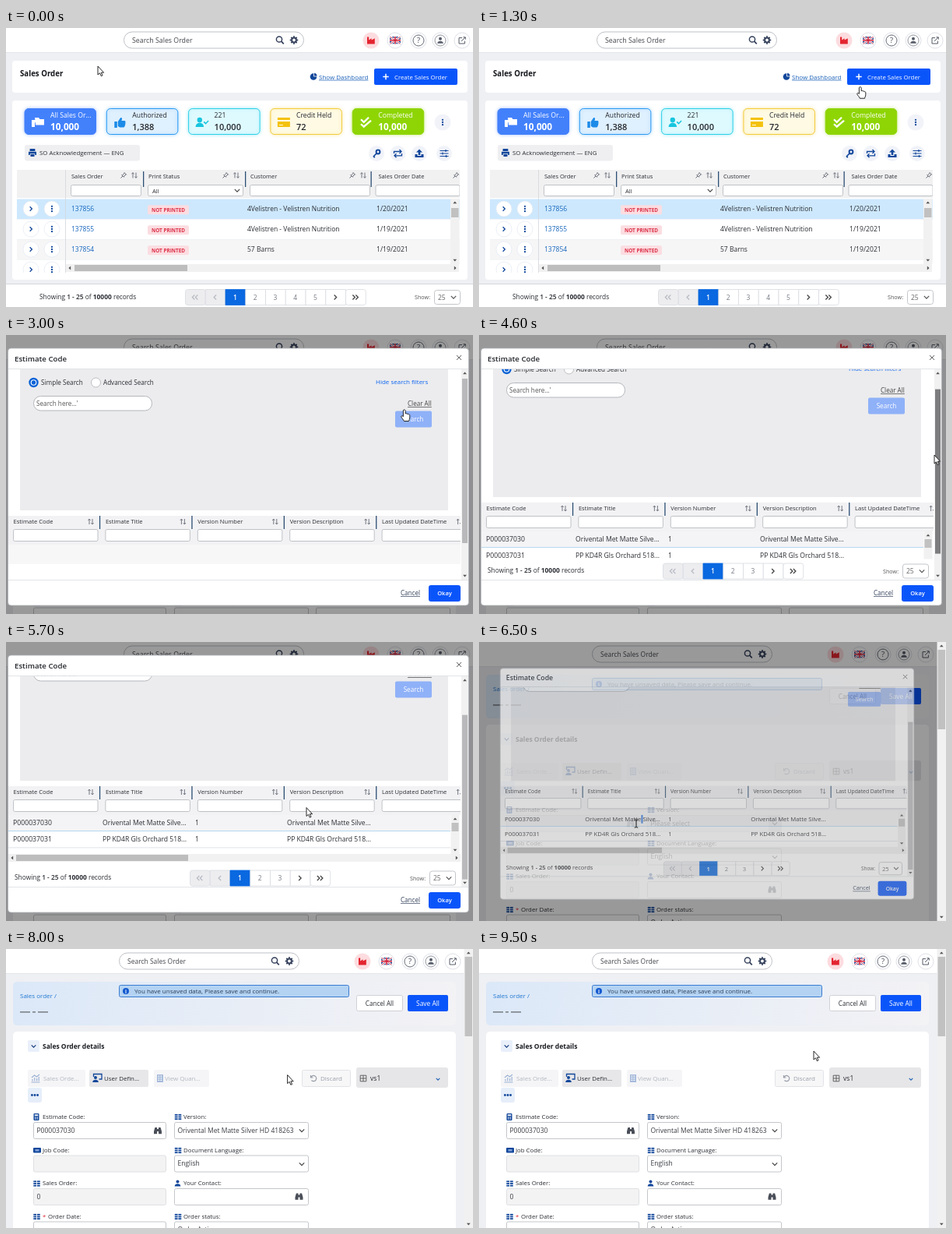
An HTML page with a canvas that plays this animation: 600x358 px, repeating every 9.6 s.

```html
<!DOCTYPE html>
<html lang="en">
<head>
<meta charset="utf-8">
<title>Sales order from estimate</title>
<style>
html, body { margin: 0; width: 100%; height: 100%; overflow: hidden; background: #fff; }
canvas { display: block; width: 600px; height: 358px; }
</style>
</head>
<body>
<canvas id="stage"></canvas>
<script>
const W = 600, H = 358, LOOP = 9600;
const FONT = '"Open Sans", "Noto Sans", sans-serif';
const BLUE = '#0a55fa', NAVY = '#12479b', INK = '#2b2d33', EDGE = '#c4c6ca', PAGE = '#eff0f4';
const ITEM = 'Orivental Met Matte Silver HD 418263';
const SHORT_ITEM = 'Orivental Met Matte Silve...';

const dpr = window.devicePixelRatio || 1;
function setup(canvas) {
  canvas.width = W * dpr;
  canvas.height = H * dpr;
  const ctx = canvas.getContext('2d');
  ctx.scale(dpr, dpr);
  return ctx;
}
const stage = setup(document.getElementById('stage'));
const layerCanvas = document.createElement('canvas');
const layer = setup(layerCanvas);
let g = stage;

// Drawing helpers
function font(size, weight = 400) { g.font = `${weight} ${size}px ${FONT}`; }
function text(s, x, y, size = 8.5, color = INK, weight = 400, align = 'left') {
  font(size, weight);
  g.textAlign = align;
  g.fillStyle = color;
  g.fillText(s, x, y);
  return g.measureText(s).width;
}
function link(s, x, y, size, color) {
  const w = text(s, x, y, size, color);
  rect(x, y + 1.2, w, 0.7, color);
}
function rect(x, y, w, h, fill) { g.fillStyle = fill; g.fillRect(x, y, w, h); }
function box(x, y, w, h, r, fill, stroke, lw = 1) {
  g.beginPath();
  g.roundRect(x, y, w, h, r);
  if (fill) { g.fillStyle = fill; g.fill(); }
  if (stroke) { g.strokeStyle = stroke; g.lineWidth = lw; g.stroke(); }
}
function disc(x, y, r, fill, stroke, lw = 1) { box(x - r, y - r, 2 * r, 2 * r, r, fill, stroke, lw); }
function path(x, y, d, fill, stroke, lw = 1) {
  const p = new Path2D(d);
  g.save();
  g.translate(x, y);
  if (fill) { g.fillStyle = fill; g.fill(p); }
  if (stroke) { g.strokeStyle = stroke; g.lineWidth = lw; g.stroke(p); }
  g.restore();
}
function clipped(x, y, w, h, draw) {
  g.save();
  g.beginPath();
  g.rect(x, y, w, h);
  g.clip();
  draw();
  g.restore();
}

// Icons, each centred on x, y
const down = (x, y, c = '#444', s = 3.2) => path(x, y, `M${-s} ${-s / 2}L0 ${s / 2}L${s} ${-s / 2}`, null, c, 1.2);
const side = (x, y, c, dir = 1, s = 3) => path(x, y, `M${-dir * s / 2} ${-s}L${dir * s / 2} 0L${-dir * s / 2} ${s}`, null, c, 1.3);
const sort = (x, y) => path(x, y, 'M-2 3.5V-3.2M-3.6 -1.6L-2 -3.4L-.4 -1.6M2 -3.5V3.2M.4 1.6L2 3.4L3.6 1.6', null, '#555a66', 0.8);
const pin = (x, y) => path(x, y, 'M-3.5 3.5L-1 1M-2.5 -.8L.8 2.5M-1.5 -.2L1.5 -3M.3 1.8L3.2 -1.3M.8 -3.6L3.8 -.6', null, '#555a66', 0.9);
const dots = (x, y, c = NAVY) => [-3.2, 0, 3.2].forEach(d => disc(x, y + d, 1.15, c));
function lens(x, y) {
  disc(x - 1, y - 1, 3.6, null, '#35415c', 1.5);
  path(x, y, 'M1.7 1.7L4.8 4.8', null, '#35415c', 1.8);
}
function gear(x, y) {
  disc(x, y, 2.9, null, '#35415c', 2);
  for (let i = 0; i < 8; i++) {
    const a = i * Math.PI / 4;
    disc(x + 4.4 * Math.cos(a), y + 4.4 * Math.sin(a), 1, '#35415c');
  }
}
function binoculars(x, y, c) {
  path(x, y, 'M-3.6 -4H-1V4.2H-5V1ZM3.6 -4H1V4.2H5V1ZM-1 -2H1V1H-1Z', c);
}
function grid(x, y, c = NAVY) {
  for (let r = 0; r < 3; r++) for (let k = 0; k < 2; k++) rect(x - 4.2 + k * 4.7, y - 3.6 + r * 2.7, 3.8, 1.8, c);
}
function user(x, y, c) {
  disc(x, y - 2, 2, c);
  path(x, y, 'M-3.8 4C-3.8 -.2 3.8 -.2 3.8 4Z', c);
}
function arrowTip(x, y, dir, c = '#555') {
  const d = { up: 'M-2.4 1.2H2.4L0 -1.6Z', down: 'M-2.4 -1.2H2.4L0 1.6Z', left: 'M1.2 -2.4V2.4L-1.6 0Z', right: 'M-1.2 -2.4V2.4L1.6 0Z' };
  path(x, y, d[dir], c);
}
function vScroll(x, y, w, h, from, to, c = '#c1c1c1') {
  rect(x, y, w, h, '#f1f1f1');
  rect(x + 1, from, w - 2, to - from, c);
  arrowTip(x + w / 2, y + 5, 'up');
  arrowTip(x + w / 2, y + h - 5, 'down');
}
function hScroll(x, y, w, h, from, to) {
  rect(x, y, w, h, '#f1f1f1');
  rect(from, y + 1, to - from, h - 2, '#bdbdbd');
  arrowTip(x + 5, y + h / 2, 'left');
  arrowTip(x + w - 5, y + h / 2, 'right');
}

function header(x, spots, size) {
  rect(0, 0, W, 32, '#fff');
  rect(0, 31, W, 1, '#e4e5ea');
  box(x + 0.5, 5, 231, 21, 10.5, '#fff', '#bfc1c6');
  text('Search Sales Order', x + 11, 19, size, '#45474d');
  lens(x + 201, 15.5);
  gear(x + 219, 15.5);
  const [plant, flag, help, person, edit] = spots;
  disc(plant, 16, 10.5, '#fcdcdf');
  path(plant, 16, 'M-5 4.5V-4.5H-2.8V-.5L.6 -2.8V-.5L4.8 -2.8V4.5Z', '#e3242f');
  for (const p of [flag, help, person, edit]) disc(p, 16, 10, '#fff', '#dfe1e8');
  clipped(flag - 7, 11, 14, 9.5, () => {
    rect(flag - 7, 11, 14, 9.5, '#23418c');
    path(flag, 15.75, 'M-7 -5L7 5M-7 5L7 -5M0 -5V5M-7 0H7', null, '#fff', 2.6);
    path(flag, 15.75, 'M-7 -5L7 5M-7 5L7 -5', null, '#d0213a', 0.8);
    path(flag, 15.75, 'M0 -5V5M-7 0H7', null, '#d0213a', 1.6);
  });
  disc(help, 16, 7, null, '#555b68', 0.9);
  text('?', help, 19.3, 9.5, '#444a58', 400, 'center');
  disc(person, 16, 7, null, '#777c88', 0.8);
  user(person, 15.8, '#555b68');
  path(edit, 16, 'M0 -3.4H-4V4H3.4V.6M-1 1L4 -4M1.4 -4.2H4.3V-1.3', null, '#555b68', 1);
}

function pager(x, y, cells, showX) {
  const w = 25.75;
  cells.forEach((label, i) => {
    const cx = x + w * i, on = label === '1';
    box(cx + 0.5, y + 0.5, w, 20, i === 0 || i === cells.length - 1 ? 3 : 0, on ? '#0a68e0' : /[«‹]/.test(label) ? '#ededf0' : '#fff', on ? '#0a68e0' : '#d9dbe0', 0.8);
    const mx = cx + w / 2, my = y + 10.5;
    if (/[«‹»›]/.test(label)) {
      const dir = /[«‹]/.test(label) ? -1 : 1, c = dir < 0 ? '#b9bcc4' : '#444';
      if (/[«»]/.test(label)) { side(mx - 2, my, c, dir); side(mx + 2, my, c, dir); }
      else side(mx, my, c, dir);
    } else text(label, mx, my + 3.2, 8.5, on ? '#fff' : '#777b84', on ? 600 : 400, 'center');
  });
  text('Show:', showX, y + 13.2, 7.2, '#555');
  box(showX + 25.5, y + 1.5, 33, 18, 3, '#fff', EDGE);
  text('25', showX + 30, y + 13.7, 8.5, '#666');
  down(showX + 50, y + 10.5, '#555');
}
function records(x, y) {
  x += text('Showing ', x, y, 8.4);
  x += text('1 - 25', x, y, 8.4, INK, 600);
  x += text(' of ', x, y, 8.4);
  x += text('10000', x, y, 8.4, INK, 700);
  text(' records', x, y, 8.4);
}

const cards = [
  ['All Sales Or...', '10,000', '#4381fb', null, '#fff', 700],
  ['Authorized', '1,388', '#dff0fe', '#2b9af3', '#1c8be8', 600],
  ['221', '10,000', '#defaff', '#2bd0e6', '#18c5de', 600],
  ['Credit Held', '72', '#fffae3', '#f2cb3a', '#f4c20d', 600],
  ['Completed', '10,000', '#8fd505', null, '#fff', 700]
];
const cardIcons = [
  'M-8 -3H-3L-1.5 -1H5V0H-4V6H-8ZM-4 -6H1L2.5 -4H8V3.5H-3Z',
  'M-7 -1H-3.5V7H-7ZM-2.5 -1L1 -6C3.5 -6.5 3 -3 2 -2H6.5C8 -1 7 5.5 5 6.5H0L-2.5 5Z',
  'M-6 -3A3.2 3.2 0 1 1 .4 -3A3.2 3.2 0 1 1 -6 -3M-8 6C-8 -1 2.5 -1 2.5 6ZM2 0L3.2 -1.2L5 .6L8 -2.6L9 -1.5L5 2.8Z',
  'M-8 -6H8V-3H-8ZM-8 -1H8V6H-8ZM-6 3V4H-1V3Z',
  'M-7 -3L-5.4 -4.6L-2.5 -1.8L3 -7L4.6 -5.4L-2.5 1.4ZM-7 3L-5.4 1.4L-2.5 4L6 -3L7.6 -1.4L-2.5 7.2Z'
];

function listPage(t) {
  rect(0, 0, W, H, PAGE);
  header(151, [469, 500, 530, 558, 586], 8.8);
  box(8, 42, 585, 41, 4, '#fff');
  box(8, 93, 585, 230, 4, '#fff');
  text('Sales Order', 18, 62, 9.7, '#16181d', 700);
  disc(395, 62.5, 4.3, NAVY);
  path(395, 62.5, 'M.5 -.5V-5A4.6 4.6 0 0 1 5 -.5Z', NAVY, '#fff', 0.8);
  link('Show Dashboard', 402, 65.5, 8, '#1d62b8');
  box(473, 52, 107, 21, 2, BLUE);
  path(488, 62.5, 'M-3.7 0H3.7M0 -3.7V3.7', null, '#fff', 1.5);
  text('Create Sales Order', 499, 65.5, 7.8, '#fff');

  cards.forEach(([label, value, fill, edge, tint, weight], i) => {
    const x = 24 + i * 105.3, ink = edge ? '#24272e' : '#fff';
    g.save();
    g.shadowColor = (edge || fill) + '66';
    g.shadowBlur = 4;
    box(x, 103.5, 91.5, 33, 5, fill, edge || fill);
    g.restore();
    path(x + 17, 121, cardIcons[i], tint);
    text(label, x + 33, 114.8, 8.7, ink);
    text(value, x + 33, 131, weight === 700 ? 11.8 : 11, ink, weight);
  });
  disc(561, 121, 10.5, '#f1f3f9');
  dots(561, 121);

  box(24, 150, 148, 20.5, 3, '#efeff1');
  path(34, 160, 'M-3.4 -5H3.4V-2H-3.4ZM-5 -1.2H5V3H3.3V1.2H-3.3V3H-5ZM-2.5 2H2.5V5H-2.5Z', NAVY);
  text('SO Acknowledgement — ENG', 43, 163, 7.9);
  [476, 503.5, 531, 563].forEach(x => disc(x, 161, 10, '#f1f3f9'));
  disc(478, 159, 2.4, null, NAVY, 2);
  path(476, 161, 'M.5 -.5L-4 4M-4 4L-2 5', null, NAVY, 1.7);
  path(503.5, 161, 'M-5 0V-2.5H4M2 -5L4.5 -2.5L2 0M5 0V2.8H-4M-2 .3L-4.5 2.8L-2 5.3', null, NAVY, 1.3);
  path(531, 161, 'M0 -5.5L4 -1.5H1.3V2H-1.3V-1.5H-4ZM-5.5 1H-2.5V3H2.5V1H5.5V5H-5.5Z', NAVY);
  path(563, 161, 'M-5.5 -3.5H5.5M-5.5 0H5.5M-5.5 3.5H5.5M2 -5V-2M-2 -1.5V1.5M2.5 2V5', null, NAVY, 1.2);

  rect(14, 182, 569, 36, '#f1f1f2');
  const cols = [[84, 90, 'Sales Order'], [183, 122, 'Print Status'], [314, 154, 'Customer'], [475.5, 108, 'Sales Order Date']];
  clipped(14, 182, 569, 36, () => cols.forEach(([x, w, label], i) => {
    if (i) rect(x - 7, 184, 1.3, 20, '#2c4f74');
    text(label, i === 3 ? x + 3 : x, 192.5, 7.5);
    pin(i === 3 ? 578 : x + w - 23, 189);
    if (i < 3) sort(x + w - 9, 189);
    box(x - 0.5, 201.5, w, 14, 2, '#fff', '#b9bbc0', 0.9);
    if (i === 1) { text('All', 188, 211.5, 7.6); down(297, 208.5); }
  }));
  const rows = [['137856', '4Velistren - Velistren Nutrition', '1/20/2021'], ['137855', '4Velistren - Velistren Nutrition', '1/19/2021'], ['137854', '57 Barns', '1/19/2021'], []];
  clipped(14, 218, 569, 96, () => rows.forEach(([id, customer, date], i) => {
    const y = 219.5 + i * 26;
    rect(14, y, 569, 26, ['#cde8fd', '#fff', '#f6f6f7', '#fff'][i]);
    rect(14, y + 25.5, 569, 0.6, '#dde1e6');
    disc(32, y + 12.5, 10, '#fff', '#e3e9f2', 0.7);
    disc(59, y + 12.5, 10, '#fff', '#e3e9f2', 0.7);
    side(32, y + 12.5, NAVY, 1, 2.7);
    dots(59, y + 12.5);
    if (!id) return;
    text(id, 84, y + 15.8, 8.5, '#1766bd');
    box(182, y + 7.8, 53, 12, 2, '#fbdde1');
    text('NOT PRINTED', 187, y + 16.2, 6.4, '#dc2f46', 700);
    text(customer, 310, y + 15.8, 8.5);
    text(date, 476, y + 15.8, 8.6);
  }));
  rect(76, 182, 0.8, 132, '#d3d6db');
  vScroll(571, 219, 11.5, 84, 231, 243);
  hScroll(77, 303, 505, 10, 88, 233);

  rect(0, 328, W, 30, '#fff');
  rect(0, 328, W, 1, '#d5d7dc');
  records(43, 347.5);
  pager(230, 335, ['«', '‹', '1', '2', '3', '4', '5', '›', '»'], 525);

  if (t >= 1600) {
    box(468, 75, 109, 34, 2, BLUE);
    rect(470, 92.5, 105, 15, '#fff');
    ['Create New', 'Create from Estimate'].forEach((s, i) => {
      const y = 85 + i * 15.5, c = i ? BLUE : '#fff';
      path(477.5, y, 'M-3.3 -4.4H1L3.3 -2V4.4H-3.3ZM-1.6 1H1.6M0 -.8V2.6', null, c, 0.9);
      text(s, 486, y + 3, 8.6, c);
    });
  }
}

function field(x, y, label, value, off) {
  text(label, x + 12, y - 4, 7.8);
  box(x + 0.5, y + 0.5, x < 100 ? 170 : 172, 21, 2, off ? '#f3f3f4' : '#fff', off ? '#dfe0e3' : EDGE);
  if (value) clipped(x, y, 166, 22, () => text(value, x + 4.5, y + 13.8, 8.5, '#3a3c42'));
}

function formPage(wide, filled) {
  rect(0, 0, W, H, PAGE);
  if (wide) header(151, [469, 500, 530, 558, 586], 8.8);
  else header(145, [458, 489, 519, 546, 574], 8.5);
  const tone = g.createLinearGradient(9, 42, 578, 98);
  tone.addColorStop(0, '#dbe8f8');
  tone.addColorStop(0.55, '#e9eef6');
  tone.addColorStop(1, '#f3f2f5');
  box(9, 42, 569, 56, 5, tone);
  box(9, 106, 569, 270, 5, '#fff');
  text('Sales order /', 18, 63.2, 8, '#2278d0');
  for (const [x, w] of [[18, 13], [34, 4], [41, 13]]) rect(x, 80.5, w, 0.9, '#333');
  box(145.5, 46.5, 295, 15, 2, '#b4d3f3', '#3b7cd0');
  disc(154, 54, 4, '#1259d0');
  text('i', 154, 56.5, 6.5, '#fff', 700, 'center');
  text('You have unsaved data, Please save and continue.', 165, 57, 8, '#2b3d55');
  box(450.5, 59.5, 59, 20, 2, '#fff', '#cfd1d6');
  text('Cancel All', 480, 72.7, 8.1, INK, 400, 'center');
  box(516, 59, 52, 21, 2, BLUE);
  text('Save All', 542, 72.7, 8.4, '#fff', 400, 'center');

  box(28, 117, 15, 15, 2, '#e9f0fa');
  down(35.5, 124.7, '#173d80', 2.8);
  text('Sales Order details', 47, 128, 8.5, '#1b1d22', 700);

  const pale = '#b3b8c1';
  box(28, 155, 74, 22, 2, '#f5f5f7');
  path(38, 166, 'M-5.5 5H5.5M-4 3.5V1M-1.2 3.5V-1M1.6 3.5V0M4.2 3.5V-2M-5 -1L-1.5 -4L1.5 -2L5 -5', null, '#9cb2d5', 1.2);
  text('Sales Orde...', 48, 168.7, 7.9, pale);
  box(107, 155, 76, 22, 2, '#e7e7e9');
  path(117.5, 165, 'M-5 -1V-4.5H5.5V2H2', null, NAVY, 1.3);
  user(115, 167, NAVY);
  text('User Defin...', 126, 168.7, 7.9);
  box(190, 155, 71, 22, 2, '#f5f5f7');
  rect(194, 161, 8, 10, '#a6badb');
  for (let i = 0; i < 6; i++) rect(195.5 + i % 2 * 3, 162.5 + (i >> 1) * 2.6, 1.7, 1.3, '#fff');
  text('View Quan...', 204, 168.7, 7.9, pale);
  box(380.5, 155.5, 62, 21, 2, '#f7f7f8', '#e2e3e7');
  path(395, 166, 'M-3.5 -4V-1H-.5M-3.2 -1.4A3.6 3.6 0 1 1 -2.5 2.5', null, '#999ea8', 1.2);
  text('Discard', 404, 168.9, 8, '#999ea8');
  box(450, 152, 118, 26, 3, '#e6e6e8');
  path(459, 166, 'M-3.8 -3.8H3.8V3.8H-3.8ZM0 -3.8V3.8M-3.8 0H3.8', null, '#555', 0.9);
  text('vs1', 468, 169, 8.6);
  down(555, 167, '#2464b8', 2.3);
  box(28, 178, 18, 19, 3, '#e6eefa');
  [-3.6, 0, 3.6].forEach(d => disc(37 + d, 187.5, 1.4, NAVY));

  field(35, 222, 'Estimate Code:', filled && 'P000037030', !filled);
  field(216, 222, 'Version:', filled ? ITEM : 'Please select', !filled);
  field(35, 264.5, 'Job Code:', '', true);
  field(216, 264.5, 'Document Language:', 'English');
  field(35, 307, 'Sales Order:', '0', true);
  field(216, 307, 'Your Contact:');
  field(35, 349.5, '', '');
  text('*', 47, 346, 7.8, '#e0313f');
  text('Order Date:', 54, 345.5, 7.8);
  field(216, 349.5, 'Order status:', wide ? '' : 'Order Active');
  if (wide) field(398, 349.5, '', '');

  box(35.5, 211, 7, 9, 1, NAVY);
  rect(36.8, 212.3, 4.4, 1.8, '#fff');
  for (let i = 0; i < 4; i++) rect(37 + i % 2 * 2.5, 215.4 + (i >> 1) * 2, 1.4, 1.2, '#fff');
  box(35, 255, 10, 6.5, 1, NAVY);
  rect(37.5, 257, 5, 2.5, '#7fa0d5');
  [[39.5, 301], [39.5, 343.5], [221, 215.5], [221, 258.5], [221, 343.5]].forEach(([x, y]) => grid(x, y));
  user(220.5, 300.5, NAVY);
  binoculars(195, 233, filled ? '#4a4e58' : '#a0a4ad');
  binoculars(376.5, 317.5, '#4a4e58');
  if (!filled) rect(372, 223, 16, 20, '#dddfe3');
  else rect(374, 223, 13, 20, '#fff');
  down(380, 233);
  down(380, 276);
}

function modal(t, scroll) {
  const loaded = t >= 3600;
  box(2.5, 17, 592, 330, 4, '#fff', '#aeb0b5', 0.8);
  text('Estimate Code', 11, 33.5, 9.7, '#24262c', 600);
  path(582, 29, 'M-3 -3L3 3M-3 3L3 -3', null, '#666', 1);

  clipped(3, 43.5, 591, 270.5, () => {
    g.save();
    g.translate(0, -scroll);
    rect(18, 40, 550, 185, '#ececee');
    disc(35.5, 61, 5, '#fff', '#0b62d6', 2.4);
    disc(35.5, 61, 2.7, '#0b62d6');
    disc(115.5, 61, 6, '#fff', '#b5b7bc', 0.9);
    text('Simple Search', 45, 63.7, 8.2);
    text('Advanced Search', 125, 63.7, 8.15);
    text('Hide search filters', 475, 62.5, 8, '#0b63f0');
    box(35.5, 78.5, 152, 18.5, 9, '#fff', '#b5b7bc');
    text("Search here...'", 39, 91, 8.2, '#555');
    link('Clear All', 516, 91, 8.1, '#444');
    box(500, 97.5, 47, 21, 2, '#8fb1f8');
    text('Search', 523.5, 111, 8.2, '#fff', 400, 'center');

    rect(3, 232, 581, 37, '#f2f2f4');
    rect(3, 269, 581, 25, '#f7f7f8');
    const heads = ['Estimate Code', 'Estimate Title', 'Version Number', 'Version Description', 'Last Updated DateTime'];
    clipped(3, 230, 581, 40, () => heads.forEach((s, i) => {
      const x = 9.5 + i * 118.4;
      if (i) rect(x - 8, 232, 1.3, 17, '#2c4f74');
      text(s, x, 242, 7.6);
      sort(x + 99.5, 239.5);
      box(x, 249.5, 108.5, 15, 2, '#fff', '#b9bbc0', 0.9);
    }));
    if (loaded) {
      const rows = [['P000037030', SHORT_ITEM], ['P000037031', 'PP KD4R Gls Orchard 518...']];
      rect(3, 269, 581, 50, '#fff');
      rows.forEach(([code, name], i) => {
        const y = 269 + i * 21;
        rect(3, y, 568, 21, i ? '#fff' : '#f4f4f6');
        rect(3, y + 20.4, 568, 1, i ? '#dfe3e8' : '#8fc9ee');
        if (!i && t >= 6300) {
          font(8.6);
          g.textAlign = 'left';
          rect(124 + g.measureText('Orivental Met Matte').width, y + 4.5, 2.4, 12, '#3b7fe0');
        }
        text(code, 9, y + 13.3, 8.7);
        text(name, 124, y + 13.3, 8.6);
        text('1', 243, y + 13.3, 8.6);
        text(name, 361, y + 13.3, 8.6);
      });
      vScroll(571.5, 269, 11, 50, 279, 290);
      hScroll(3, 319, 581, 10, 13, 234);
    }
    g.restore();
    if (loaded) {
      rect(3, 287.5, 581, 26.5, '#fff');
      records(11, 305);
      pager(236, 292.5, ['«', '‹', '1', '2', '3', '›', '»'], 519);
    }
    const thumb = 56 + scroll * 0.8;
    vScroll(585, 44, 9, 270, thumb, thumb + 211, t >= 4300 && t < 5300 ? '#7d7d80' : '#b9b9bc');
  });
  rect(3, 43, 591, 0.8, '#dddfe3');
  rect(3, 314, 591, 0.8, '#dddfe3');
  link('Cancel', 507, 334, 8.1, '#33415c');
  box(543, 321, 41, 21, 3, BLUE);
  text('Okay', 563.5, 334.3, 7.5, '#fff', 600, 'center');
}

// Scaled and faded as one sheet; away runs from 0 (open) to 1 (gone).
function showModal(t, away, scroll, shift) {
  rect(0, 0, W, H, 'rgba(0,0,0,0.4)');
  g = layer;
  g.clearRect(0, 0, W, H);
  g.save();
  const k = 1 - 0.3 * away;
  g.translate(298.5 - shift, 182);
  g.scale(k, k);
  g.translate(-298.5, -182);
  modal(t, scroll);
  g.restore();
  g = stage;
  g.globalAlpha = 1 - away;
  g.drawImage(layerCanvas, 0, 0, W, H);
  g.globalAlpha = 1;
}

// Motion
const route = [
  [0, 118, 49], [300, 62, 130], [500, 130, 222], [700, 270, 210], [1000, 396, 117],
  [1400, 520, 62], [1500, 520, 62], [2100, 511, 96], [3500, 511, 96], [4200, 585, 141],
  [4300, 585, 141], [4600, 585, 154], [5000, 585, 179], [5300, 585, 189], [5400, 570, 192],
  [6000, 202, 233], [7300, 202, 233], [8300, 430, 131]
];
const scrollKeys = [[4300, 0], [4600, 17], [5000, 47]];
function along(keys, t) {
  if (t <= keys[0][0]) return keys[0].slice(1);
  const i = keys.findIndex(k => k[0] > t);
  if (i < 0) return keys[keys.length - 1].slice(1);
  const a = keys[i - 1], b = keys[i], u = (t - a[0]) / (b[0] - a[0]);
  return a.slice(1).map((v, j) => v + (b[j + 1] - v) * u);
}

function cursor(t) {
  const [x, y] = along(route, t);
  const hand = t >= 1300 && t < 3700;
  const beam = t >= 5800 && t < 7500;
  if (beam) path(x, y, 'M-2.2 -5H-.6L0 -4.4L.6 -5H2.2M0 -4.4V4.4M-2.2 5H-.6L0 4.4L.6 5H2.2', null, '#111', 1);
  else if (hand) path(x, y, 'M0 0C1.4 -.4 2.2 .4 2.2 1.5V5C3 4.3 4 4.6 4.2 5.4C5 4.9 6 5.2 6.1 6C7 5.6 7.8 6.2 7.8 7.2V10C7.8 12 6.6 13 6.6 14.5H.3C0 12.8 -2.5 11 -3.2 9C-3.6 7.6 -1.8 7.3 -.6 8.7V1C-.6 .5 -.4 .1 0 0Z', '#fff', '#111', 0.9);
  else path(x, y, 'M0 0V11L2.5 8.8L4.3 12.7L6 11.9L4.3 8.2H7.6Z', '#fff', '#111', 0.9);
}

function draw(t) {
  g = stage;
  g.clearRect(0, 0, W, H);
  const [scroll] = along(scrollKeys, t);
  const closing = t >= 6500;
  if (t < 2900) listPage(t);
  else formPage(!closing, t >= 7000);
  if (t >= 2900 && t < 6600) {
    const away = t < 3000 ? 0.4 : closing ? 0.34 : 0;
    showModal(t, away, scroll, closing ? 5.5 : 0);
  }
  // The page's own scrollbar lies outside the dimmed area.
  if (closing) vScroll(588.5, 0, 11.5, H, 10, 112);
  cursor(t);
}

const start = performance.now();
function tick() {
  const t = (performance.now() - start) % LOOP;
  draw(Math.floor(t / 100) * 100);
  requestAnimationFrame(tick);
}
tick();
</script>
</body>
</html>
```
